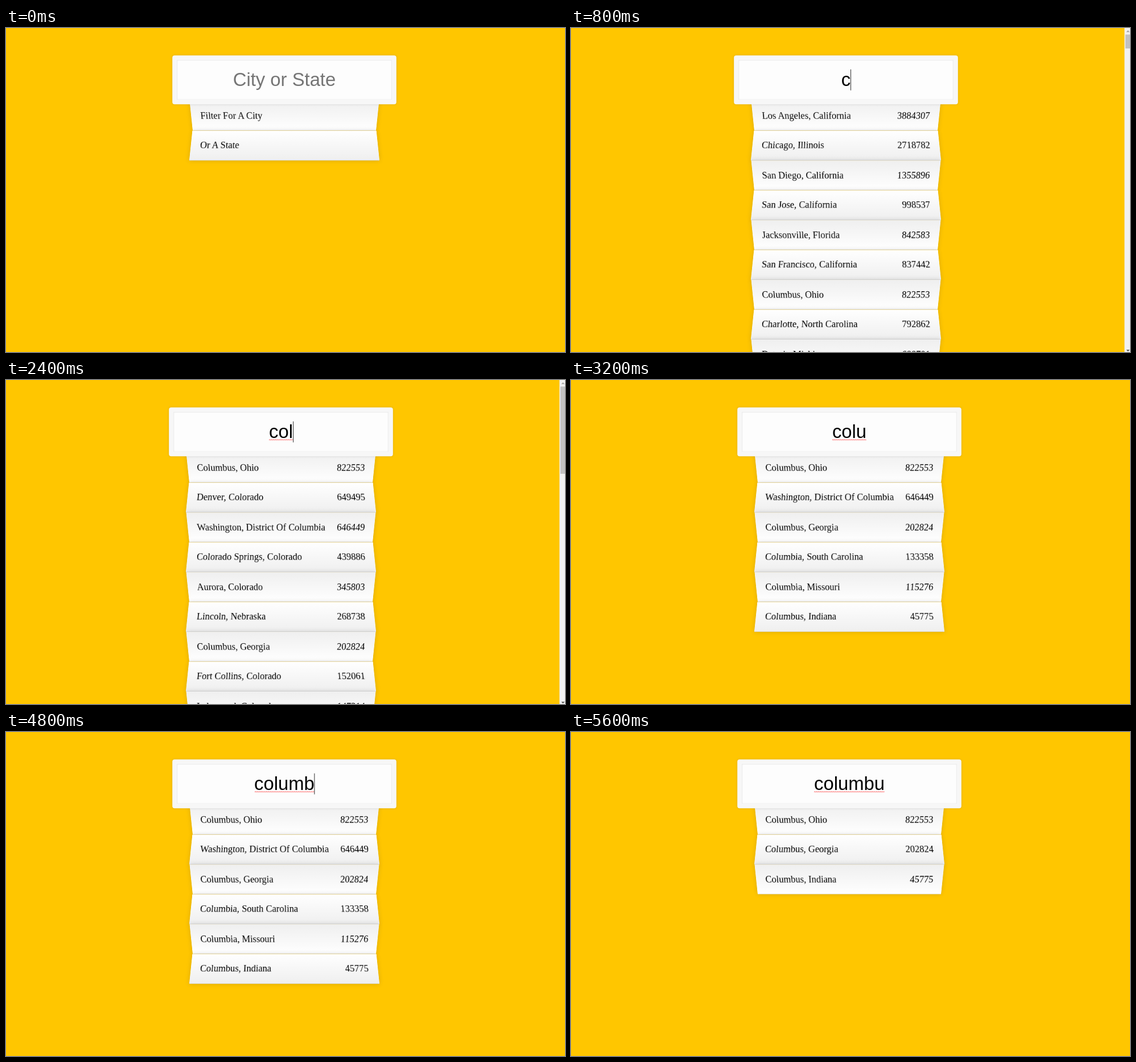
An HTML page that plays this animation: 982 by 570 pixels, repeating every 7000 ms.

```html
<!DOCTYPE html>
<html lang="en">
<head>
<meta charset="utf-8">
<title>City search</title>
<style>
  html, body { margin: 0; width: 100%; height: 100%; overflow: hidden; background: #ffc600; }
  #stage { position: absolute; left: 0; top: 0; width: 982px; height: 570px; overflow: hidden; background: #ffc600; }
  #form {
    position: absolute; left: 325px; top: -0.8px; width: 400px;
    transform: scale(.82); transform-origin: 0 0;
    font: 20px/23px "Liberation Serif", "Times New Roman", serif; color: #000;
  }
  .scrolls #form { left: 318.9px; }
  #search {
    position: absolute; left: -40px; top: 60px; z-index: 2;
    box-sizing: border-box; width: 480px; height: 105px; padding: 20px;
    border: 10px solid #f7f7f7; border-radius: 5px; background: #fdfdfd;
    box-shadow: 0 0 5px rgba(0,0,0,.12), inset 0 0 2px rgba(0,0,0,.19);
    font: 40px/45px "Liberation Sans", Arial, sans-serif; text-align: center; white-space: nowrap;
  }
  #word { position: relative; display: inline-block; }
  #word.hint { color: #757575; }
  #caret { position: absolute; left: 100%; top: 0; width: 1px; height: 45px; background: #000; }
  #squiggle { position: absolute; left: 0; top: 38px; width: 100%; height: 3px; }
  #list { position: absolute; left: 0; top: 155px; width: 400px; margin: 0; padding: 0; }
  #list li {
    display: flex; justify-content: space-between; box-sizing: border-box; height: 64px;
    padding: 20px; list-style: none; white-space: nowrap;
    border-bottom: 1px solid #d8d8d8; box-shadow: 0 0 10px rgba(0,0,0,.14);
  }
  #list li:nth-child(even) {
    transform: perspective(100px) rotateX(3deg) translateY(2px) scale(1.001);
    background: linear-gradient(to bottom, #fff 0%, #efefef 100%);
  }
  #list li:nth-child(odd) {
    transform: perspective(100px) rotateX(-3deg) translateY(3px);
    background: linear-gradient(to top, #fff 0%, #efefef 100%);
  }
  #bar { position: absolute; left: 972px; top: 0; display: none; }
  .scrolls #bar { display: block; }
</style>
</head>
<body>
<div id="stage">
  <div id="form">
    <div id="search"><span id="word"><span id="text"></span><svg id="squiggle">
      <defs><pattern id="zig" width="4" height="3" patternUnits="userSpaceOnUse">
        <path d="M-1 1.5 L0 2.5 L2 .5 L4 2.5 L5 1.5" fill="none" stroke="#f00" stroke-width=".9"/>
      </pattern></defs>
      <rect width="100%" height="3" fill="url(#zig)"/>
    </svg><span id="caret"></span></span></div>
    <ul id="list"></ul>
  </div>
  <svg id="bar" width="10" height="570">
    <rect x=".3" width="10" height="570" fill="#f1f1f1"/>
    <rect id="thumb" x="1.9" y="11.5" width="9" fill="#c1c1c1"/>
    <path d="M3.5 7.2 L6.45 4.1 L9.4 7.2Z" fill="#a3a3a3"/>
    <path d="M3.5 566 L6.45 569.1 L9.4 566Z" fill="#505050"/>
  </svg>
</div>
<script>
const LOOP = 7000;
const THUMB_TOP = 11.5;

const hints = ["Filter For A City", "Or A State"];

const forC = [
  "Los Angeles, California|3884307", "Chicago, Illinois|2718782",
  "San Diego, California|1355896", "San Jose, California|998537",
  "Jacksonville, Florida|842583", "San Francisco, California|837442",
  "Columbus, Ohio|822553", "Charlotte, North Carolina|792862",
  "Detroit, Michigan|688701"
];

const forCo = [
  "San Francisco, California|837442", "Columbus, Ohio|822553",
  "Denver, Colorado|649495", "Washington, District Of Columbia|646449",
  "Milwaukee, Wisconsin|599164", "Albuquerque, New Mexico|556495",
  "Colorado Springs, Colorado|439886", "Aurora, Colorado|345803",
  "Corpus Christi, Texas|316381"
];

const forCol = [
  "Columbus, Ohio|822553", "Denver, Colorado|649495",
  "Washington, District Of Columbia|646449", "Colorado Springs, Colorado|439886",
  "Aurora, Colorado|345803", "Lincoln, Nebraska|268738",
  "Columbus, Georgia|202824", "Fort Collins, Colorado|152061",
  "Lakewood, Colorado|147214"
];

const forColu = [
  "Columbus, Ohio|822553", "Washington, District Of Columbia|646449",
  "Columbus, Georgia|202824", "Columbia, South Carolina|133358",
  "Columbia, Missouri|115276", "Columbus, Indiana|45775"
];

const forColumbu = forColu.filter(row => row.startsWith("Columbus"));

// thumbEnd is the lower edge of the scroll thumb; without it the page does not scroll
const steps = [
  { at: 0,    typed: "",        rows: hints },
  { at: 800,  typed: "c",       rows: forC,   caret: true, thumbEnd: 36 },
  { at: 1600, typed: "co",      rows: forCo,  caret: true, thumbEnd: 57 },
  { at: 2400, typed: "col",     rows: forCol, caret: true, thumbEnd: 165, wrong: true },
  { at: 3200, typed: "colu",    rows: forColu, wrong: true },
  { at: 4000, typed: "colum",   rows: forColu, wrong: true },
  { at: 4800, typed: "columb",  rows: forColu, wrong: true, caret: true },
  { at: 5600, typed: "columbu", rows: forColumbu, wrong: true }
];

const $ = id => document.getElementById(id);
const show = (id, on) => { $(id).style.display = on ? "block" : "none"; };

function makeRow(row) {
  const li = document.createElement("li");
  for (const part of row.split("|")) {
    const span = document.createElement("span");
    span.textContent = part;
    li.append(span);
  }
  return li;
}

function render(step) {
  $("text").textContent = step.typed || "City or State";
  $("word").classList.toggle("hint", !step.typed);
  show("caret", step.caret);
  show("squiggle", step.wrong);
  $("list").replaceChildren(...step.rows.map(makeRow));
  $("stage").classList.toggle("scrolls", Boolean(step.thumbEnd));
  if (step.thumbEnd) $("thumb").setAttribute("height", step.thumbEnd - THUMB_TOP);
}

const start = performance.now();
let current = null;

function tick() {
  const t = Math.max(0, performance.now() - start) % LOOP;
  const step = steps.findLast(s => s.at <= t);
  if (step !== current) render(current = step);
  requestAnimationFrame(tick);
}
tick();
</script>
</body>
</html>
```
